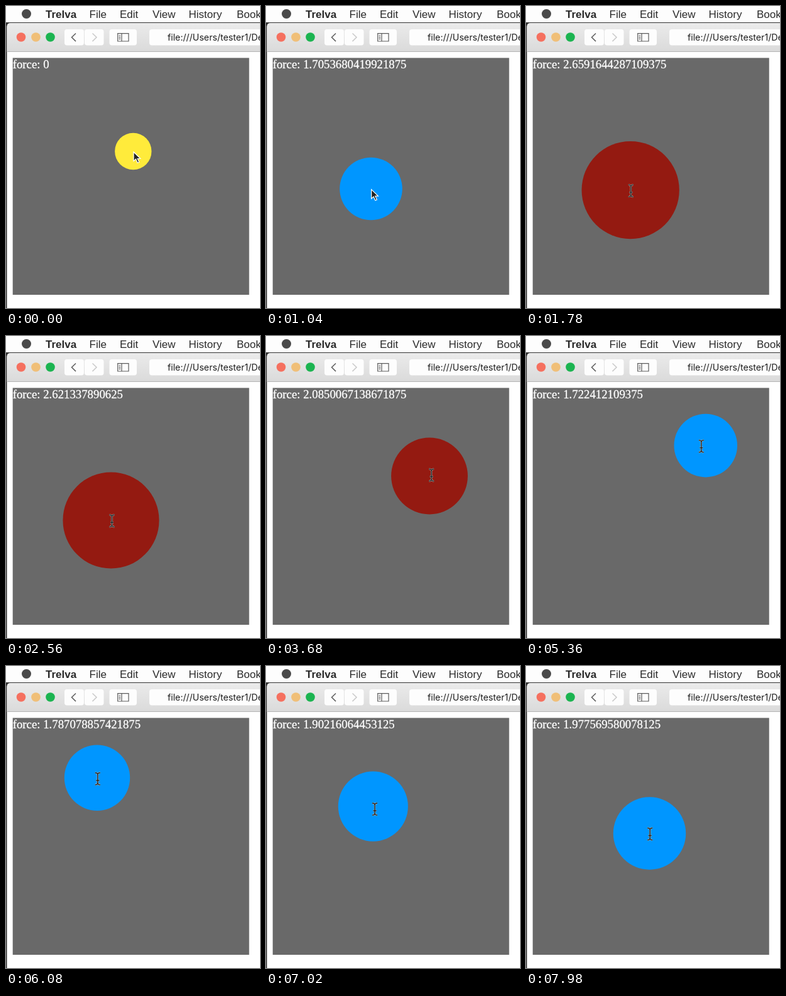
Write an HTML page that moves like this. It is 404x480 px and loops after 8000 ms.

```html
<!DOCTYPE html>
<html lang="en">
<head>
<meta charset="utf-8">
<title>Force demo</title>
<style>
  html, body { margin: 0; width: 100%; height: 100%; overflow: hidden; background: #fff; }
  svg { display: block; width: 404px; height: 480px; }
  .menu { font: 17px "Liberation Sans", Arial, sans-serif; fill: #2a2a2a; }
  .url { font: 14.2px Inter, sans-serif; fill: #1e1e1e; }
  .icon { fill: none; stroke: #5c5c5c; stroke-width: 1.5; }
  #force { font: 18.8px "Liberation Serif", Times, serif; fill: #fff; stroke: #fff; stroke-width: .3; }
</style>
</head>
<body>
<svg viewBox="0 0 404 480">
  <defs>
    <linearGradient id="bar" x2="0" y2="1">
      <stop stop-color="#ebebeb"/><stop offset="1" stop-color="#dadada"/>
    </linearGradient>
    <path id="stem" fill="none" d="M-4-9.5Q0-9.5 0-6.5 0-9.5 4-9.5M0-7V7M-4 9.5Q0 9.5 0 6.5 0 9.5 4 9.5M-2.5 2.5H2.5"/>
  </defs>

  <!-- Menu bar -->
  <rect width="404" height="480" fill="#333"/>
  <rect width="404" height="26" fill="#fdfdfd"/>
  <circle cx="32.5" cy="12.5" r="7.5" fill="#4a4a4a"/>
  <g class="menu">
    <text x="63" y="19" font-weight="bold">Trelva</text>
    <text x="132.5" y="19">File</text>
    <text x="181" y="19">Edit</text>
    <text x="233" y="19">View</text>
    <text x="290.5" y="19">History</text>
    <text x="367" y="19">Bookmarks</text>
  </g>

  <!-- Browser window -->
  <path d="M1.5 480V33q0-6 6-6H404V480z" fill="#fff"/>
  <path d="M1.5 73V33q0-6 6-6H404V73z" fill="url(#bar)"/>
  <path d="M1.5 72.5H404" stroke="#b4b4b4"/>
  <circle cx="24" cy="49.5" r="7.3" fill="#f5705f"/>
  <circle cx="47.5" cy="49.5" r="7.3" fill="#f0bf78"/>
  <circle cx="70.5" cy="49.5" r="7.3" fill="#1bb450"/>
  <g fill="#fdfdfd">
    <rect x="93" y="37" width="31" height="25.5" rx="4"/>
    <rect x="125" y="37" width="30.5" height="25.5" rx="4"/>
    <rect x="164.5" y="37" width="43.5" height="25.5" rx="4"/>
    <rect x="228" y="37" width="190" height="25.5" rx="4"/>
  </g>
  <g class="icon">
    <path d="M111 43.5l-6.5 6.3 6.5 6.3"/>
    <path d="M137.5 43.5l6.5 6.3-6.5 6.3" stroke="#c9c9c9"/>
    <path d="M177.7 43.7h17.3v12.3h-17.3zM184 43.7v12.3M179.5 47h2.7M179.5 49.7h2.7M179.5 52.4h2.7" stroke-width="1.2"/>
  </g>
  <text class="url" x="257" y="55">file:///Users/tester1/Desktop</text>

  <!-- Page -->
  <rect x="10.7" y="82.5" width="376" height="376.5" fill="#696969"/>
  <circle id="ball"/>
  <text id="force" x="10.7" y="99"></text>

  <path id="arrow" d="M0 0V14.5L3.5 11.3 6.2 17.3 8.8 16.2 6.2 10.5H10.8Z"
        fill="#222" stroke="#fff" stroke-width="1.2"/>
  <g id="beam">
    <use href="#stem" stroke="#b9b9b9" stroke-width="2.4"/>
    <use href="#stem" stroke="#222" stroke-width="1.4"/>
  </g>
</svg>
<script>
const LOOP = 8000, STEP = 20, UNIT_RADIUS = 29.2;
const POINTER_LEAD = 50, BEAM_START = 1500;

// The drag's turning points; equal neighbours are pauses
const stops = [
  { at: 0, x: 202.3, y: 231, force: 0 },
  { at: 240, x: 202.3, y: 231, force: 0 },
  { at: 1040, x: 167, y: 290.5, force: 1.7053680419921875 },
  { at: 2300, x: 166, y: 293, force: 2.95 },
  { at: 2560, x: 167, y: 293, force: 2.621337890625 },
  { at: 3680, x: 260, y: 222.5, force: 2.0850067138671875 },
  { at: 4540, x: 290.6, y: 187, force: 1.6898040771484375 },
  { at: 4900, x: 294, y: 174, force: 1.72 },
  { at: 5240, x: 294, y: 174, force: 1.72 },
  { at: 6080, x: 145, y: 177.7, force: 1.787078857421875 },
  { at: 7980, x: 196.5, y: 266, force: 1.977569580078125 },
];
const last = stops.length - 1;

const slope = (i, key) => (stops[i + 1][key] - stops[i][key]) / (stops[i + 1].at - stops[i].at);

function tangent(i, key) {
  if (i === 0 || i === last) return 0;
  const a = slope(i - 1, key), b = slope(i, key);
  return a * b > 0 ? 2 * a * b / (a + b) : 0;
}

// Smooth interpolation that never overshoots a stop
function sample(time, key) {
  const t = Math.min(time, stops[last].at);
  let i = 0;
  while (i < last - 1 && stops[i + 1].at <= t) i++;
  const p = stops[i], q = stops[i + 1], span = q.at - p.at;
  const u = (t - p.at) / span, v = 1 - u;
  return v * v * (1 + 2 * u) * p[key] + u * u * (3 - 2 * u) * q[key]
    + u * v * span * (v * tangent(i, key) - u * tangent(i + 1, key));
}

const [ball, label, arrow, beam] = ["ball", "force", "arrow", "beam"].map(id => document.getElementById(id));

function draw() {
  const t = Math.floor(performance.now() % LOOP / STEP) * STEP;
  const force = Math.round(sample(t, "force") * 65536) / 65536;
  ball.setAttribute("cx", sample(t, "x"));
  ball.setAttribute("cy", sample(t, "y"));
  ball.setAttribute("r", UNIT_RADIUS * Math.max(1, force));
  ball.setAttribute("fill", force < 1 ? "#ffeb3b" : force < 2 ? "#0096ff" : "#941a11");
  label.textContent = "force: " + force;

  const x = sample(t + POINTER_LEAD, "x") + 0.7, y = sample(t + POINTER_LEAD, "y") + 1;
  const isBeam = t >= BEAM_START;
  arrow.style.display = isBeam ? "none" : "";
  beam.style.display = isBeam ? "" : "none";
  (isBeam ? beam : arrow).setAttribute("transform", `translate(${x} ${y})`);
  requestAnimationFrame(draw);
}
draw();
</script>
</body>
</html>
```
